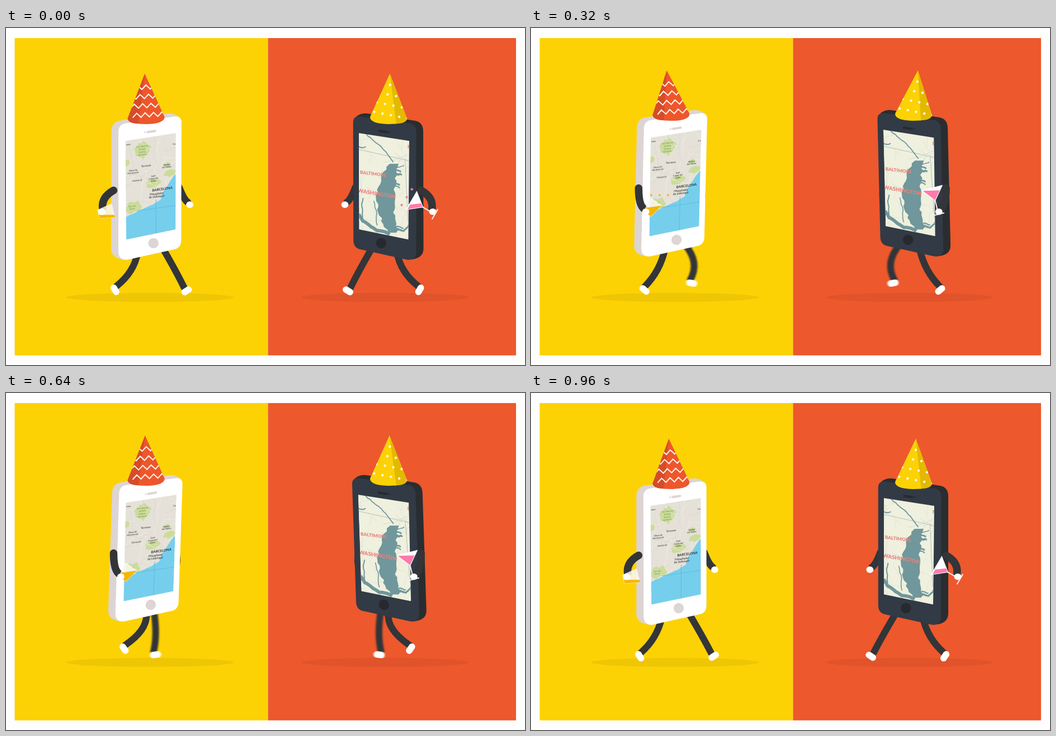
An HTML page that plays this animation: 928 px wide and 603 px high, repeating every 1 s.

```html
<!DOCTYPE html>
<html lang="en">
<head>
<meta charset="utf-8">
<title>Party phones</title>
<style>
html, body { margin: 0; width: 100%; height: 100%; overflow: hidden; background: #fefefe; }
svg { display: block; width: 928px; height: 603px; }
text { font-family: Lato, "Open Sans", sans-serif; text-anchor: middle; }
</style>
</head>
<body>
<svg id="stage" viewBox="0 0 926 601.7" preserveAspectRatio="none"></svg>
<script>
const LOOP = 1000, STEP = 40, AXIS = 932.5, TAU = 2 * Math.PI;
const CLOTH = '#333538';
const { sin, cos, max, min, abs, hypot, floor, PI } = Math;

// ---- drawing helpers ----
function seeded(s) {
  return () => {
    s = (s * 1664525 + 1013904223) >>> 0;
    return s / 4294967296;
  };
}

// Roughens a polyline by splitting its segments.
function jag(pts, amp, rnd, depth = 3) {
  for (let k = 0; k < depth; k++) {
    const out = [pts[0]], off = () => (rnd() - .5) * amp;
    for (let i = 1; i < pts.length; i++) {
      const [a, b] = pts[i - 1], [c, d] = pts[i];
      out.push([(a + c) / 2 + off(), (b + d) / 2 + off()], pts[i]);
    }
    pts = out;
    amp *= .65;
  }
  return pts;
}
const line = pts => 'M' + pts.map(p => p.map(v => v.toFixed(1)).join()).join('L');
const area = (pts, fill) => `<path d="${line(pts)}Z" fill="${fill}"/>`;
const stroke = (d, color, w, extra = '') =>
  `<path d="${d}" fill="none" stroke="${color}" stroke-width="${w}" ${extra}/>`;
const label = (s, x, y, size, slope, color, weight = 700) =>
  `<text transform="translate(${x} ${y}) skewY(${slope})" font-size="${size}" fill="${color}" font-weight="${weight}">${s}</text>`;

function blob(x, y, rx, ry, fill, rnd) {
  const pts = [];
  for (let a = 0; a < TAU; a += TAU / 22) {
    const r = .75 + rnd() * .45;
    pts.push([x + rx * r * cos(a), y + ry * r * sin(a) - .25 * rx * cos(a)]);
  }
  return area(pts, fill);
}

function roads(n, x, y, color, rnd, w = .6) {
  let d = '';
  for (let i = 0; i < n; i++) {
    const a = rnd() * TAU, len = 15 + rnd() * 45, px = x + rnd() * 92, py = y + rnd() * 185;
    d += line(jag([[px, py], [px + len * cos(a), py + len * sin(a)]], 9, rnd));
  }
  return stroke(d, color, w);
}

// ---- maps ----
function coastMap() {
  const rnd = seeded(11), green = '#cbdc9a', ink = '#55534e';
  const wood = (x, y, rx, ry) => blob(x, y, rx, ry, green, rnd);
  const coast = jag([[304, 260], [285, 285], [276, 306], [241, 324], [213, 338]], 3, rnd);
  const lines = (words, x, y, gap, size, color) =>
    words.split('|').map((s, i) => label(s, x, y + i * gap, size, -7, color)).join('');
  return '<rect x="205" y="180" width="105" height="205" fill="#e5e1d8"/>'
    + wood(243, 217, 14, 15) + wood(216, 240, 5, 6) + wood(264, 276, 14, 8)
    + wood(292, 258, 11, 6) + wood(227, 320, 15, 10) + wood(287, 243, 7, 4)
    + roads(26, 208, 187, '#f3f0e8', rnd) + roads(14, 208, 187, '#d6d1c6', rnd)
    + area(coast.concat([[205, 390], [310, 390]]), '#76ceed')
    + stroke('M234 326L304 316M268 306V370', '#5bbadd', .9)
    + lines('resa', 218, 209, 0, 4.2, ink) + lines('Ca', 300, 208, 0, 4.2, ink)
    + lines('Parc Natural|de Sant|Llorenç|del Munt', 243, 212, 5, 3.7, '#7f9659')
    + lines('Terrassa', 250, 247, 0, 4.8, ink) + lines('Mollet|del Vallès', 287, 245, 4, 4, ink)
    + lines('Olesa de|Montserrat', 227, 255, 4.5, 4, ink) + lines('Martorell', 234, 273, 0, 4, ink)
    + lines('Sant|Cugat del|Vallès', 263, 265, 4.5, 4, ink)
    + lines('Parc del|Garraf', 225, 319, 4.5, 3.6, '#7f9659')
    + label('BARCELONA', 279, 289, 6.1, -8, '#333')
    + lines("l'Hospitalet|de Llobregat", 269, 297, 5, 5, '#444');
}

function bayMap() {
  const rnd = seeded(29), water = '#70979b';
  const creek = (pts, w, amp = 5) => stroke(line(jag(pts, amp, rnd)), water, w, 'stroke-linejoin="round"');
  const west = [], east = [];
  let inlets = '';
  for (let v = 0; v <= 1; v += .04) {
    const y = 242 + 128 * v, x = 692 - 14 * sin(PI * v), w = 6 + 8 * sin(PI * v);
    west.push([x - w - rnd() * 6, y]);
    east.unshift([x + w + rnd() * 6 - 3, y]);
    if (rnd() < .5) inlets += creek([[x + w - 3, y], [x + w + 5 + rnd() * 9, y - 5 + rnd() * 10]], 1 + rnd() * 2);
  }
  return '<rect x="620" y="180" width="105" height="205" fill="#eff0de"/>'
    + roads(24, 625, 190, '#d9dfd7', rnd) + roads(7, 650, 190, '#c3cfcc', rnd)
    + stroke('M628 216L722 237M712 234L717 345', '#a9b4b1', .8)
    + creek([[638, 186], [661, 205], [691, 239]], 1.8, 4)
    + creek([[630, 211], [642, 211]], 1.8)
    + area(west.concat(east), water) + inlets
    + creek([[629, 333], [642, 347], [684, 368]], 6, 7)
    + creek([[637, 303], [636, 337]], 2) + creek([[656, 308], [662, 352]], 1.6)
    + creek([[690, 357], [709, 362], [720, 352]], 3)
    + label('BALTIMORE', 655, 262.5, 8.2, 7, '#e9827c', 900)
    + label('WASHINGTON', 661, 298.5, 9.5, 10, '#e9827c', 900) + label('N', 720, 215, 9, 8, '#e9827c', 900);
}

// ---- hat patterns ----
function zigzags() {
  let out = '';
  for (let row = 0; row < 4; row++) {
    const pts = [];
    for (let i = 0; i < 11; i++) pts.push([214 + 4 * row + i * 7.5, 107 + row * 16.3 - i * .4 + (i % 2 ? -3.8 : 3.8)]);
    out += stroke(line(pts), '#fff3ec', 2);
  }
  return out;
}

function dots() {
  let out = '';
  for (let row = -3; row < 2; row++)
    for (let i = -2; i < 3; i++)
      out += `<circle cx="${242 + 15 * i + 4 * row}" cy="${138 - 3 * i + 17 * row}" r="2.2" fill="#fff8dc"/>`;
  return out;
}

// ---- figures ----
const HAT = 'M250 81L283 158Q283 170 251 171Q218 171 217 161Z';
const mirror = `matrix(-1 0 0 1 ${AXIS} 0)`;

function figure(id, o) {
  const flip = o.flip ? `transform="${mirror}"` : '';
  const limb = (n, w) => stroke('', CLOTH, w, `id="${n + id}" stroke-linecap="round"`);
  const hand = n => `<ellipse id="${n + id}" rx="6.4" ry="5.8" fill="#fff"/>`;
  const leg = n => `<filter id="blur${n}${id}" filterUnits="userSpaceOnUse" x="150" y="370" width="220" height="130">
      <feGaussianBlur stdDeviation="0"/></filter>
    <g filter="url(#blur${n}${id})">${limb('leg' + n, 12)}
      <rect id="shoe${n}${id}" x="-10" y="-5.8" width="20" height="11.6" rx="5.8" fill="#fff"/></g>`;
  return `<clipPath id="screen${id}"><path d="M213 201L303 187V359L215 377Z"/></clipPath>
    <clipPath id="hatClip${id}"><path d="${HAT}"/></clipPath>
    <clipPath id="cup${id}"><path d="${o.inner}"/></clipPath>
    <g ${flip}>
      ${leg(0)}${leg(1)}${limb('back', 12.5)}${hand('backHand')}
      <g id="body${id}">
        <path fill="${o.side}" d="M188 184Q188 168 202 165L284 152.5Q297 150 307 157L303 393L214 413Q188 412 188 393Z"/>
        <path fill="${o.front}" d="M200.5 185Q200.5 171 214 169.5L300 157.5Q313 156 313 168V378Q313 392 301 394.5L218 413Q201 415 201 398Z"/>
        <path d="M252.5 185.3L266 183.2" stroke="${o.detail}" stroke-width="4" stroke-linecap="round"/>
        <circle cx="248" cy="185.6" r="1.5" fill="${o.detail}"/>
        <circle cx="263.5" cy="383.5" r="9.2" fill="${o.detail}"/>
        <g clip-path="url(#screen${id})"><g ${flip}>${o.map}</g></g>
      </g>
      <g id="hat${id}"><path d="${HAT}" fill="${o.hat}"/>
        <path d="M250 81L236 170Q218 170 217 161Z" fill="${o.shade}"/>
        <g clip-path="url(#hatClip${id})">${o.pattern}</g></g>
      ${limb('front', 13.5)}
      <g id="glass${id}">${o.glass}
        <g clip-path="url(#cup${id})"><rect id="liquid${id}" x="-60" width="120" height="70" fill="${o.liquid}"/></g></g>
      ${hand('frontHand')}
    </g>`;
}

const figures = [
  {
    flip: false, side: '#ddd4d4', front: '#fff', detail: '#ded5d6', map: coastMap(),
    hat: '#ee562b', shade: '#d64c28', pattern: zigzags(), liquid: '#f5b700',
    glass: '<path d="M-8 0L-13 -28H13L8 0Z" fill="#fbf8f4" opacity=".85"/>',
    inner: 'M-7.5 -.5L-12.5 -28H12.5L7.5 -.5Z',
    hold: c => ({ x: 192.5 - 28 * c, tilt: 49 + 27 * c, depth: 11, level: 5 * c - 1, slope: 24 * c * c - 6 * c - 18 }),
    splash: { start: 260, x: 216, y: 305, dx: 13.5, dy: 0 }
  },
  {
    flip: true, side: '#2a2d30', front: '#323a45', detail: '#262a2f', map: bayMap(),
    hat: '#fcd206', shade: '#e3b900', pattern: dots(), liquid: '#ff7bab',
    glass: '<path d="M0 -24L-20 -49H20Z" fill="#fff"/><path d="M0 -27V0M-10.5 0H10.5" stroke="#f8eeee" stroke-width="2"/>',
    inner: 'M0 -26L-17 -47H17Z',
    hold: c => ({ x: 192 - 25 * c, tilt: 30 + 30 * c, depth: 42, level: 3 * c, slope: 3 + 3 * c }),
    splash: { start: 0, x: 706, y: 316, dx: 9, dy: -14 }
  }
];

document.getElementById('stage').innerHTML = `
  <rect x="15.5" y="18" width="452" height="566.5" fill="#fcd205"/>
  <rect x="467.5" y="18" width="442.5" height="566.5" fill="#ed582d"/>
  <ellipse cx="257" cy="481" rx="150" ry="8" fill="#efc604"/>
  <ellipse cx="676" cy="481" rx="149" ry="8" fill="#e0532b"/>`
  + figures.map((o, id) => figure(id, o)
    + [0, 1, 2].map(i => `<circle id="drop${i}${id}" fill="${o.liquid}"/>`).join('')).join('');

// ---- motion ----
const set = (id, name, value) => document.getElementById(id).setAttribute(name, value);
const wave = (t, period, shift) => cos(TAU * (t + shift) / period);

// Quadratic curve that passes through its middle point.
const bend = (ax, ay, mx, my, bx, by) =>
  `M${ax} ${ay}Q${2 * mx - (ax + bx) / 2} ${2 * my - (ay + by) / 2} ${bx} ${by}`;

const footX = u => 247 + 66 * cos(TAU * u) + 13 * cos(2 * TAU * u);

// u = 0 is the moment the heel lands in front; the second half is the swing.
function poseLeg(n, id, u, dy) {
  u %= 1;
  const a = TAU * u;
  const lift = u > .5 ? 17 * sin(PI * (2 * u - 1) ** 1.2) : 0;
  const hx = 257 + 24 * cos(a + .15), hy = 396 + dy - (hx - 257) * .2;
  const x = footX(u), y = 470 - lift - (u < .5 ? 3 * sin(a) : 0);
  const knee = 3 - 3 * cos(a) + .6 * lift;
  const turn = 12 - 45 * cos(a) + 1.8 * lift, r = turn * PI / 180;
  const speed = abs(footX(u + .02) - footX(u - .02));
  set(`leg${n}${id}`, 'd', bend(hx, hy, (hx + x) / 2 + knee, (hy + y) / 2 - .2 * lift,
    x - 3 * cos(r) + 4 * sin(r), y - 6));
  set(`shoe${n}${id}`, 'transform', `translate(${x} ${y}) rotate(${turn})`);
  document.querySelector(`#blur${n}${id} feGaussianBlur`)
    .setAttribute('stdDeviation', `${max(0, min(1.8, speed / 8 - .6))} .2`);
}

function poseArm(name, id, sx, sy, mx, my, x, y) {
  const len = hypot(x - mx, y - my);
  set(name + id, 'd', bend(sx, sy, mx, my, x - 6 * (x - mx) / len, y - 6 * (y - my) / len));
  set(name + 'Hand' + id, 'transform', `translate(${x} ${y})`);
}

function pose(id, o, t) {
  const half = LOOP / 2;
  const dy = 4.2 * wave(t, half, 20) - 3.5;
  const lean = 3.2 * (wave(t, half, 40) - 1) / 158;
  const sway = (4.3 - 3.5 * wave(t, half, -80)) / 80;
  set('body' + id, 'transform', `matrix(1 0 ${lean} 1 ${-225 * lean} ${dy})`);
  set('hat' + id, 'transform', `matrix(1 0 ${sway} 1 ${-161 * sway} ${dy})`);

  const u = (t + STEP) / LOOP;
  poseLeg(0, id, u, dy);
  poseLeg(1, id, u + .5, dy);

  const c = wave(t, LOOP, 20);
  poseArm('front', id, 192, 289.5 + .7 * dy, 188 - 12 * c, 308 - 4 * c, 193 - 22 * c, 328);
  poseArm('back', id, 305 + 4 * c, 284 + .7 * dy, 309 + 8 * c, 302, 308 + 20 * c, 315.5);

  const g = o.hold(c);
  set('glass' + id, 'transform', `translate(${g.x} 332.5) rotate(${g.tilt})`);
  set('liquid' + id, 'transform',
    `translate(0 ${-g.depth}) rotate(${-g.tilt}) translate(0 ${g.level}) rotate(${g.slope})`);

  const s = o.splash, v = (t - s.start) / 230;
  for (let i = 0; i < 3; i++) {
    set(`drop${i}${id}`, 'r', v >= 0 && v <= 1 ? 2.2 - v : 0);
    set(`drop${i}${id}`, 'transform', `translate(${s.x + i * s.dx + (i - 1) * 6 * v} ${s.y + i * s.dy - 25 * v})`);
  }
}

function draw() {
  const t = floor(performance.now() / STEP) * STEP % LOOP;
  figures.forEach((o, id) => pose(id, o, t));
  requestAnimationFrame(draw);
}
draw();
</script>
</body>
</html>
```
